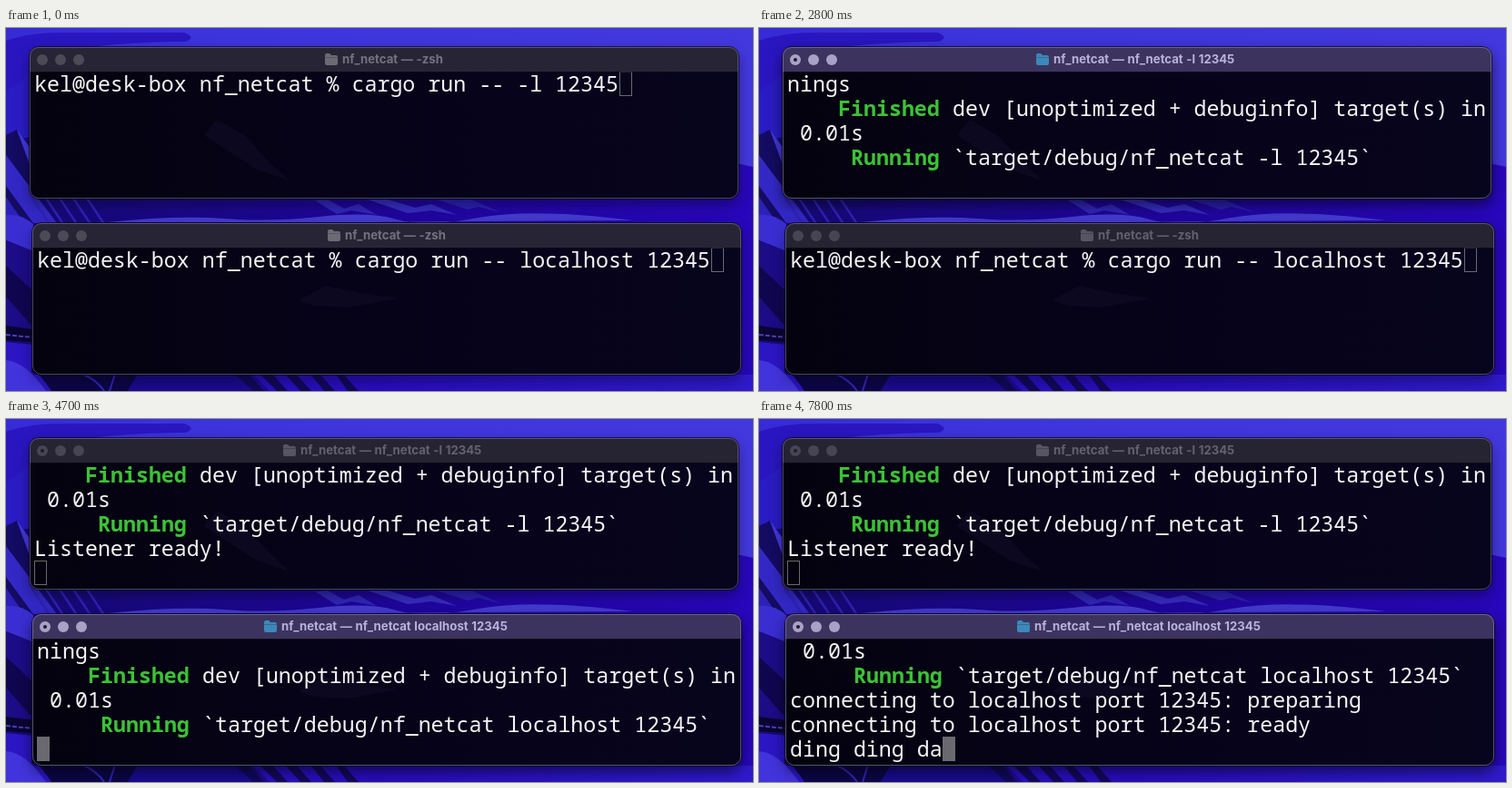
Recreate the animation shown at these times as an HTML page. Size 822 px wide and 400 px high, loop 8000 ms.

```html
<!DOCTYPE html>
<html lang="en">
<head>
<meta charset="utf-8">
<title>nf_netcat</title>
<style>
  html, body { margin: 0; width: 100%; height: 100%; overflow: hidden; background: #2408b0; }
  svg { display: block; width: 822px; height: 400px; }
  .mono text { font: 400 23.3px "Noto Sans Mono", monospace; fill: #f6f4f6; white-space: pre; }
  .mono text.ok { font-weight: 700; fill: #3cc235; }
  .title { font: 700 13.2px Inter, sans-serif; word-spacing: .5px; }
</style>
</head>
<body>
<svg viewBox="0 0 822 400">
  <defs>
    <linearGradient id="sky" x2="1" y2="0">
      <stop offset="0" stop-color="#362bd6"/><stop offset=".3" stop-color="#3d35dc"/><stop offset="1" stop-color="#4338de"/>
    </linearGradient>
    <linearGradient id="sea" x2="1" y2="0">
      <stop offset="0" stop-color="#160a74"/><stop offset=".45" stop-color="#1e0698"/><stop offset="1" stop-color="#2807bc"/>
    </linearGradient>
    <linearGradient id="floor" x2="1" y2="0">
      <stop offset="0" stop-color="#2c16c4"/><stop offset=".5" stop-color="#290cbe"/><stop offset="1" stop-color="#2f1acc"/>
    </linearGradient>
    <linearGradient id="glass" x2="1" y2="0">
      <stop offset="0" stop-color="#04020e"/><stop offset=".4" stop-color="#060318"/><stop offset="1" stop-color="#07041d"/>
    </linearGradient>
    <filter id="blur" x="-10%" y="-30%" width="120%" height="160%"><feGaussianBlur stdDeviation="8"/></filter>
  </defs>
  <g id="wall">
    <rect width="822" height="400" fill="url(#sea)"/>
    <path d="M0 0H822V153L790 146 0 116Z" fill="url(#sky)"/>
    <path d="M0 14Q28 4 70 5H196Q210 10 198 15Q120 16 90 22H30V60L0 76Z" fill="#2a16c0"/>
    <path d="M0 70L28 50V120L0 125Z" fill="#2a1cc4"/>
    <path d="M0 118L12 112 27 150V215H0Z" fill="#140b62"/>
    <path d="M12 112L28 134V156Z" fill="#4338dc"/>
    <path d="M0 140L56 215H30L0 174Z" fill="#3328c6"/>
    <path d="M0 186L20 215H0Z" fill="#2c20b8"/>
    <g id="quills" stroke="#2f22b4" stroke-width="2.5"></g>
    <path d="M0 206Q16 204 30 216V246L0 234Z" fill="#3a2ed2"/>
    <path d="M0 234L30 246V334L0 330Z" fill="#1c0c86"/>
    <path d="M0 262L30 290V330L0 296Z" fill="#100650"/>
    <path d="M112 214Q190 206 240 210T345 208 430 211 520 209 690 212L520 213 400 214Z" fill="#443bd0"/>
    <path d="M340 190L354 189 372 199 388 194 408 206 380 201 364 205Z" fill="#3126b8"/>
    <path d="M398 189H420L450 198 468 194 496 206 468 201 442 204Z" fill="#372dc2"/>
    <path d="M474 189H512L544 203 520 197 508 200Z" fill="#2c20b4"/>
    <path d="M0 328L30 332V346L0 344Z" fill="#0a0430"/>
    <path d="M0 338L30 341" stroke="#4a3fc0" stroke-width="2" stroke-dasharray="5 2"/>
    <path d="M0 346L30 349V382H822V400H0Z" fill="url(#floor)"/>
    <path d="M0 366Q22 368 44 400H0Z" fill="#4234dc"/>
    <path d="M28 374Q38 382 50 400H134L146 380H28Z" fill="#0d0648"/>
    <path d="M84 381Q100 388 108 400M120 381L114 400" stroke="#3424c0" stroke-width="2" fill="none"/>
    <path d="M146 380H270L290 400H134Z" fill="#1c0a90"/>
    <g id="streaks" fill="#12085c"></g>
  </g>
  <g id="wins"></g>
</svg>
<script>
const LOOP = 8000, CW = 14, LH = 27;
const $ = id => document.getElementById(id);
const rect = (x, y, w, h, more) => `<rect x="${x}" y="${y}" width="${w}" height="${h}" ${more}/>`;
const repeat = (n, f) => Array.from({ length: n }, (_, i) => f(i)).join('');

$('quills').innerHTML = repeat(5, i => `<path d="M${i * 15 + 28} 186l20 30"/>`);
$('streaks').innerHTML = repeat(5, i => `<path d="M${250 + i * 28} 380h${16 - i * 2}l18 20h-12z"/>`);

// Colours of a window frame: idle, focused at the prompt, focused while a program runs
const LOOK = {
  rest: { bar: '#272535', light: '#4d4a58', text: '#75727f', folder: '#6d6a76' },
  idle: { bar: '#262433', light: '#484552', text: '#64616e', folder: '#585562' },
  live: { bar: '#3b365e', light: '#a9a2c6', text: '#cbc6e2', folder: '#3ab6f0' },
  busy: { bar: '#3c345f', light: '#a9a2c6', text: '#b9b2de', folder: '#3d88ba' }
};

const PROMPT = 'kel@desk-box nf_netcat % cargo run -- ';
const build = args => ['nings', '    *Finished* dev [unoptimized + debuginfo] target(s) in',
  ' 0.01s', `     *Running* \`target/debug/nf_netcat ${args}\``];

// A line is plain text; a *word* is shown bold green
function line(str, x, y) {
  let col = 0;
  return str.split('*').map((part, i) => {
    const lead = part.length - part.trimStart().length;
    const out = part.trim() &&
      `<text x="${x + (col + lead) * CW}" y="${y}"${i % 2 ? ' class="ok"' : ''}>${part.trim()}</text>`;
    col += part.length;
    return out;
  }).join('');
}

function cursor(kind, x, y) {
  if (kind === 'solid') return rect(x, y, CW, LH, 'fill="#6b6970"');
  if (kind === 'hollow') return rect(x + .5, y + .5, CW - 1, LH - 1, 'fill="none" stroke="#6b6970"');
  return '';
}

function folder(x, y, fill) {
  return `<path d="M${x} ${y + 2}q0-2 2-2h3l2 2h5q2 0 2 2v7q0 2-2 2h-10q-2 0-2-2z" fill="${fill}"/>` +
    `<path d="M${x} ${y + 4.5}h14" stroke="#000" stroke-opacity=".2"/>`;
}

function win(x, y, s) {
  const c = LOOK[s.look], focused = s.look === 'live' || s.look === 'busy';
  const rows = s.rows, last = rows.length - 1, tx = x + 5, top = y + 27;
  const lights = [14, 34, 54].map(d => `<circle cx="${x + d}" cy="${y + 14}" r="6" fill="${c.light}"/>`).join('');
  const smudge = y < 100
    ? 'M218 118L232 101 262 118 292 150 312 168 276 156Z'
    : 'M322 300L352 284 390 292 432 298 376 308 340 306Z';
  return rect(x, y + 6, 780, 167, `rx="10" fill="#000" opacity="${focused ? .6 : .4}" filter="url(#blur)"`) +
    rect(x - .5, y - .5, 781, 168, 'rx="10.5" fill="none" stroke="#05021c" stroke-opacity=".7"') +
    rect(x, y, 780, 167, 'rx="10" fill="url(#glass)"') +
    `<path d="${smudge}" fill="#0c081f"/>` +
    cursor(s.cursor, tx + rows[last].replace(/\*/g, '').length * CW, top + last * LH) +
    `<g class="mono">${rows.map((r, i) => line(r, tx, top + 22 + i * LH)).join('')}</g>` +
    `<path d="M${x} ${y + 27.5}V${y + 10}q0-10 10-10h760q10 0 10 10v17.5z" fill="${c.bar}"/>` +
    `<path d="M${x} ${y + 27.5}h780" stroke="#000" stroke-opacity=".45"/>` +
    lights + (s.args ? `<circle cx="${x + 14}" cy="${y + 14}" r="2" fill="#1e1a30"/>` : '') +
    folder(s.titleX, y + 7, c.folder) +
    `<text class="title" x="${s.titleX + 19}" y="${y + 18}" fill="${c.text}">nf_netcat — ${s.args ? 'nf_netcat ' + s.args : '-zsh'}</text>` +
    rect(x + .5, y + .5, 779, 166, `rx="9.5" fill="none" stroke="#8d89a0" stroke-opacity="${focused ? .6 : .5}"`);
}

const between = (t, a, b) => t >= a && t < b;

function upper(t) {
  const args = '-l 12345', ran = t >= 2200, ready = t >= 2900;
  let rows = [PROMPT + args];
  if (t >= 2100) rows.push('');
  if (ran) rows = [...build(args), ''];
  if (ready) rows = [...rows.slice(1, 4), 'Listener ready!', ''];
  const focus = between(t, 1200, 4000);
  const off = between(t, 1800, 2100) || between(t, 2800, 2900) || between(t, 3800, 4000);
  return {
    rows, args: ran && args, titleX: ran ? 305 : 351,
    look: focus ? (ran ? 'busy' : 'live') : t < 1200 ? 'rest' : 'idle',
    cursor: t < 1300 || t >= 4000 ? 'hollow' : off ? '' : 'solid'
  };
}

// [time, characters typed]
const KEYS = [[6300, 1], [6400, 2], [6500, 3], [6600, 4], [6700, 5], [7000, 6],
  [7200, 7], [7300, 9], [7400, 10], [7700, 11], [7800, 12]];

function lower(t) {
  const args = 'localhost 12345', ran = t >= 4600;
  let rows = [PROMPT + args];
  if (t >= 4500) rows.push('');
  if (ran) rows = [...build(args), ''];
  if (t >= 4900) {
    const typed = KEYS.reduce((n, [at, k]) => t >= at ? k : n, 0);
    rows = [...rows.slice(2, 4), ...['preparing', 'ready'].map(s => 'connecting to localhost port 12345: ' + s),
      'ding ding da'.slice(0, typed)];
  }
  return {
    rows, args: ran && args, titleX: ran ? 284 : 354,
    look: t >= 4000 ? (ran ? 'busy' : 'live') : t < 1200 ? 'rest' : 'idle',
    cursor: t < 4000 ? 'hollow' : between(t, 6000, 6300) ? '' : 'solid'
  };
}

let shown = '';
function draw(t) {
  const a = win(26, 21, upper(t)), b = win(29, 215, lower(t));
  const html = t < 4000 ? b + a : a + b;
  if (html !== shown) $('wins').innerHTML = shown = html;
}

const start = performance.now();
function tick() {
  draw((performance.now() - start) % LOOP);
  requestAnimationFrame(tick);
}
draw(0);
requestAnimationFrame(tick);
</script>
</body>
</html>
```
